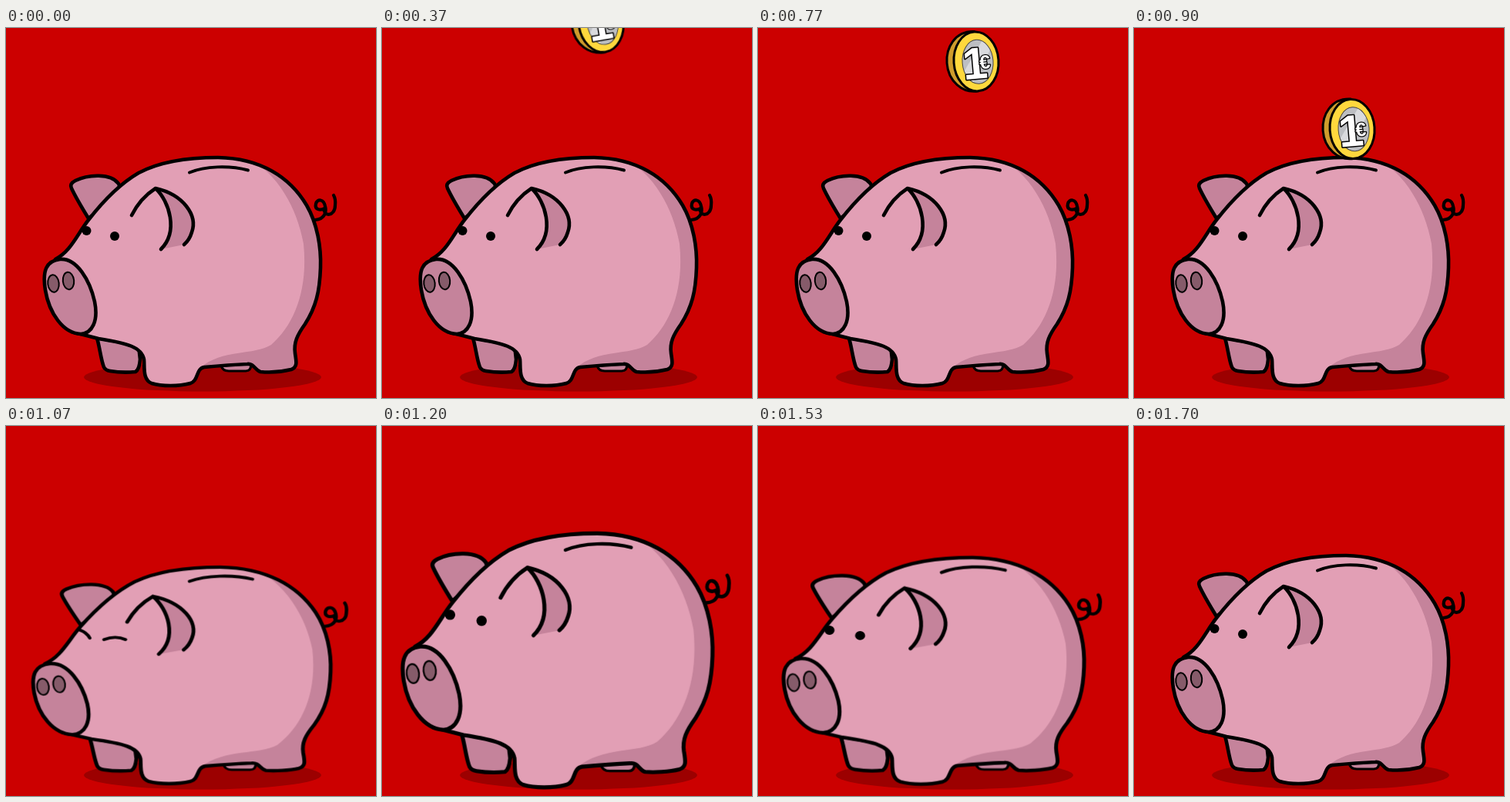
An HTML page that plays this animation: 480 by 480 pixels, repeating every 1.81 s.

```html
<!DOCTYPE html>
<html lang="en">
<head>
<meta charset="utf-8">
<title>Piggy bank</title>
<style>
  html, body { margin: 0; width: 100%; height: 100%; overflow: hidden; background: #c00; }
  svg { display: block; width: 100%; height: 100%; }
  .line { fill: none; stroke: #000; stroke-width: 4.6; stroke-linecap: round; stroke-linejoin: round; }
  .dark { fill: #c5839b; }
  .skin { fill: #e29fb5; }
  .hole { fill: #865b6a; stroke: #000; stroke-width: 2; }
  .mark { font-family: "Liberation Sans", Arial, sans-serif; font-weight: bold; fill: #fff;
          stroke: #000; paint-order: stroke; stroke-linejoin: round; }

  .pig { transform-origin: 238px 464px; animation: gulp 1810ms infinite; }
  .coin { transform-origin: 278px 43px; animation: drop 1810ms linear infinite; }
  .open { animation: open 1810ms step-end infinite; }
  .shut { animation: shut 1810ms step-end infinite; }

  /* rest, squash on impact, swell, settle fatter, snap back */
  @keyframes gulp {
    0%, 52.49% { transform: translateY(0) scale(1, 1); animation-timing-function: ease-out; }
    57.46% { transform: translateY(2px) scale(1.08, .938); animation-timing-function: linear; }
    59.12% { transform: translateY(0) scale(1.077, .949); animation-timing-function: ease-in-out; }
    67.96% { transform: translateY(5px) scale(1.125, 1.125); animation-timing-function: ease-in-out; }
    73.48% { transform: translateY(3px) scale(1.116, 1.082); animation-timing-function: ease-in-out; }
    84.53% { transform: translateY(.5px) scale(1.088, .993); }
    88.4% { transform: translateY(.5px) scale(1.087, .995); animation-timing-function: linear; }
    93.92%, 100% { transform: translateY(0) scale(1, 1); }
  }
  /* slow drift into view, then a fast fall through the slot */
  @keyframes drop {
    0% { transform: translate(2px, -93px) rotate(-9deg); }
    20.44% { transform: translate(1px, -50px) rotate(-5deg); }
    42.54% { transform: translate(0, 0) rotate(0deg); }
    45.3% { transform: translate(0, 7px) rotate(0deg); animation-timing-function: cubic-bezier(.45, .1, .8, .7); }
    53.04%, 100% { transform: translate(0, 205px) rotate(0deg); }
  }
  @keyframes open { 0%, 53.04% { opacity: 1; } 53.05% { opacity: 0; } 66.3%, 100% { opacity: 1; } }
  @keyframes shut { 0%, 53.04% { opacity: 0; } 53.05% { opacity: 1; } 66.3%, 100% { opacity: 0; } }
</style>
</head>
<body>
<svg viewBox="0 0 480 480">
  <defs>
    <path id="body" d="M64 300C84 290 92 268 107 249C128 222 148 202 172 188C202 172 240 168 275 168
      C330 169 368 193 390 230C404 254 409 285 408 311C407 342 402 362 388 384C378 398 373 408 375 422
      C377 434 378 440 370 443C358 446 341 447 330 446C323 444 322 435 313 436C290 437 268 439 257 440
      C246 442 250 458 239 461C224 465 202 465 189 461C177 456 180 440 179 430C176 414 158 409 120 403L85 394"/>
    <clipPath id="inBody"><use href="#body"/></clipPath>
    <clipPath id="aboveSlot"><path d="M0 0H480V187H314C290 178 258 179 238 187H0Z"/></clipPath>
    <clipPath id="inCore"><ellipse cx="285" cy="44" rx="20" ry="28.5"/></clipPath>
  </defs>

  <rect width="480" height="480" fill="#c00"/>
  <ellipse cx="255" cy="453" rx="154" ry="18.5" fill="#9c0000"/>

  <g class="pig">
    <!-- far legs and ear, tail -->
    <path class="line dark" stroke-width="4" d="M118 402C122 416 123 430 127 440Q129 444 135 445C147 447 158 447 168 446Q173 443 174 430L172 412Z"/>
    <path class="line dark" style="stroke-width:3" d="M279 438Q281 445 289 445H311Q318 445 318 436Z"/>
    <path class="line dark" d="M107 247C99 234 91 221 85 208Q82 202 90 198C106 190 136 188 146 202L150 212Z"/>
    <path class="line" style="stroke-width:4.2" d="M401 249C414 248 416 238 414 231C412 222 404 221 402 228C400 236 408 237 413 234C411 245 427 245 427 230Q428 222 425 217"/>

    <use href="#body" class="skin"/>
    <path class="dark" clip-path="url(#inBody)" d="M312 168C353 188 378 235 386 280C392 340 374 385 344 411C322 425 280 416 252 441L430 470V160Z"/>
    <use href="#body" class="line"/>

    <!-- near ear -->
    <path class="dark" d="M194 208C212 225 224 264 201 287L231 281Q240 273 242 262C245 242 228 216 194 208Z"/>
    <path class="line" d="M163 243C171 227 180 217 194 208C212 225 224 264 201 287M194 208C230 216 249 243 241 265Q238 275 231 281"/>

    <path class="line" style="stroke-width:4" d="M238 187.500C258 179 290 178 314 184.500"/>

    <g class="open"><circle cx="104.500" cy="263" r="6"/><circle cx="141" cy="270" r="6"/></g>
    <path class="line shut" style="stroke-width:4" d="M106 254Q114 257 118 265M135 267Q149 261 161 267"/>

    <!-- snout -->
    <path class="line dark" d="M70 300C92 298 109 328 115 355C120 380 112 396 97 397C74 396 56 370 51 340C47 315 52 302 70 300Z"/>
    <ellipse class="hole" cx="61.500" cy="331.500" rx="7.200" ry="11.200" transform="rotate(-6 61.500 331.500)"/>
    <ellipse class="hole" cx="81" cy="328" rx="7.200" ry="11.200" transform="rotate(-6 81 328)"/>
  </g>

  <g clip-path="url(#aboveSlot)">
    <g class="coin">
      <g transform="rotate(-4 280 43)">
        <path d="M283 4.500C258 2 245 23 245 43C245 66 262 84 283 82Z" fill="#cf9c2c" stroke="#000" stroke-width="3"/>
        <ellipse cx="283" cy="43.500" rx="29" ry="38.500" fill="#ffd83d" stroke="#000" stroke-width="3"/>
        <ellipse cx="285" cy="44" rx="20" ry="28.500" fill="#bcbec2"/>
        <path clip-path="url(#inCore)" d="M262 62L296 12L308 20L274 76Z" fill="#d9dadd"/>
        <ellipse cx="285" cy="44" rx="20" ry="28.500" fill="none" stroke="#444" stroke-width="1"/>
      </g>
      <text class="mark" font-size="58" stroke-width="3" transform="translate(267 67) rotate(-5)">1</text>
      <text class="mark" font-size="25" stroke-width="2.500" transform="translate(288 53) rotate(-5)">€</text>
    </g>
  </g>
</svg>
</body>
</html>
```
